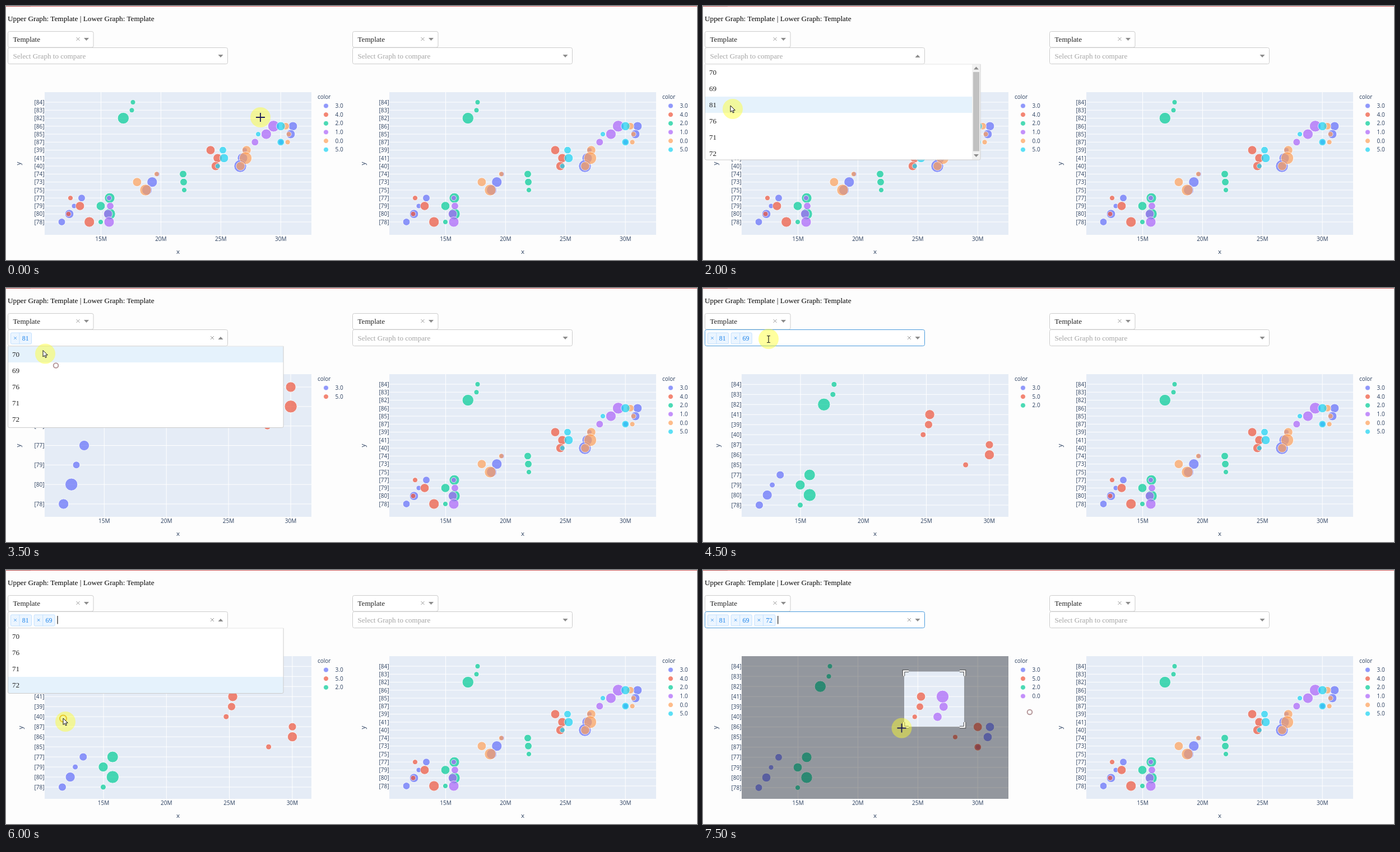
Animation, 1233 px wide and 454 px high, one loop 8000 ms. Source, as an HTML page:

```html
<!DOCTYPE html>
<html lang="en">
<head>
<meta charset="utf-8">
<title>Graph comparison</title>
<style>
html, body { margin: 0; width: 100%; height: 100%; overflow: hidden; background: #fdfdfd; }
svg { display: block; width: 1233px; height: 454px; }
text { white-space: pre; }
.page { font: 13.1px "Liberation Serif", "Times New Roman", serif; fill: #222; }
.head { font-size: 13.25px; fill: #000; }
.tag { font: 11.8px "Liberation Serif", "Times New Roman", serif; fill: #1a82ea; }
.hint { fill: #a5a5a5; }
.plot { font: 10px "Open Sans", sans-serif; fill: #2a3f5f; }
.title { font-size: 11.5px; }
.mid { text-anchor: middle; }
.end { text-anchor: end; }
</style>
</head>
<body>
<svg id="stage" viewBox="0 0 1233 454"></svg>
<script>
const STEP = 500, STEPS = 16;
const PALETTE = ['#636efa', '#ef553b', '#00cc96', '#ab63fa', '#ffa15a', '#19d3f3'];
const MAX_RADIUS = 11.2;

const words = s => s.split(' ');
const TOP = '84 83 82', RIGHT = '86 85 87', MID = '39 41 40', LEFT = '74 73 75', LOW = '77 79 80 78';

// A run of points: one digit of weight per row, x moves by `step` per row, odd rows are shifted by `shift`.
const run = (group, weights, x, step = 0, shift = 0) => words(group).map((row, i) =>
  ({row, weight: +weights[i], x: x + step * i + shift * (i % 2)}));

const POINTS = {
  '3.0': [run(RIGHT, '331', 512, -10.7, 6.7), run(MID, '146', 426, -4), run(LEFT, '144', 270, -9.2), run(LOW, '2132', 135, -11, -2.5)],
  '4.0': [run(MID, '333', 365, 4.6, 8), run('77 80', '11', 115, -3.5), run('79 78', '34', 132, 16.7)],
  '2.0': [run(TOP, '115', 226.5, -8.6, 6.6), run(LEFT, '221', 316, 1), run(LOW, '4351', 185, 0, -16)],
  '1.0': [run(RIGHT, '542', 477.5, -16.6, 3.5), run(LOW, '1234', 184, -1, 3)],
  '0.0': [run(RIGHT, '211', 499, 1.8, 3.8), run(MID, '363', 429.3, -5.4, 3.6), run(LEFT, '135', 268.8, -9.9, -25)],
  '5.0': [run(RIGHT, '312', 490.3, 0, -40.3), run(MID, '231', 387, -4.6, 6.6)]
};

// Each trace may be limited to some rows; `ticks` holds the x of 15M and the distance to the next tick.
const graph = (rows, top, bottom, ticks, traces, yTitle = 26) => ({rows: words(rows), top, bottom, ticks, traces, yTitle});
const BASE = [169.5, 106.9];
const GRAPHS = {
  full: graph(`${TOP} ${RIGHT} ${MID} ${LEFT} ${LOW}`, 172, 386, BASE, words('3.0 4.0 2.0 1.0 0.0 5.0').map(v => [v])),
  one: graph(`87 86 85 ${LOW}`, 177, 386, [175.3, 110.9], [['3.0', LOW], ['5.0']]),
  two: graph(`${TOP} 41 39 40 87 86 85 ${LOW}`, 172.3, 388, [174, 112.3], [['3.0', LOW], ['5.0'], ['2.0']], 30),
  three: graph(`${TOP} 41 39 40 ${RIGHT} ${LOW}`, 172, 389, BASE, [['3.0', `${RIGHT} ${LOW}`], ['5.0'], ['2.0'], ['0.0', MID]])
};

const OPTIONS = words('70 69 81 76 71 72');
const open = hover => ({menu: true, focus: false, hover});
const pick = (...tags) => ({menu: false, focus: true, caret: false, tags});

// One entry per step; each changes part of the state.
const TIMELINE = [
  {graph: 'full', tags: [], cursor: ['cross', 454, 199]},
  {cursor: ['cross', 169, 393]},
  {cursor: ['cross', 148.5, 161]},
  {...open(0), cursor: ['beam', 82, 96]},
  {...open(2), cursor: ['arrow', 53, 184]},
  {...pick('81'), cursor: ['arrow', 61.5, 101], ring: [49, 187]},
  {graph: 'one', cursor: ['beam', 68, 90], ring: null},
  {...open(0), cursor: ['arrow', 70, 117.5], ring: [89, 138.5]},
  {...open(1), caret: true, cursor: ['arrow', 92, 144], ring: null},
  {...pick('81', '69'), graph: 'two', cursor: ['beam', 117, 91]},
  {...open(0), caret: true, cursor: ['arrow', 112, 122]},
  {...open(2), caret: false, cursor: ['arrow', 108, 180]},
  {...open(3), caret: true, cursor: ['arrow', 106, 271], ring: [102, 265.5, 6, '#d39b2a']},
  {...pick('81', '69', '72'), graph: 'three', cursor: ['cross', 146, 288], ring: null},
  {caret: true, cursor: ['cross', 511, 186]},
  {zoom: [359, 181.5, 466, 280], cursor: ['cross', 354.5, 282.5], ring: [583, 254]}
];

const rect = (x, y, w, h, attrs) => `<rect x="${x}" y="${y}" width="${w}" height="${h}" ${attrs}/>`;
const circle = (x, y, r, attrs) => `<circle cx="${x}" cy="${y}" r="${r}" ${attrs}/>`;
const path = (d, attrs) => `<path d="${d}" ${attrs}/>`;
const text = (x, y, s, cls, attrs = '') => `<text x="${x}" y="${y}" class="${cls}" ${attrs}>${s}</text>`;
const cross = (x, y, r, color) => path(`M${x - r} ${y - r}l${2 * r} ${2 * r}m0 ${-2 * r}l${-2 * r} ${2 * r}`, `stroke="${color}"`);
const triangle = (x, y, up) => path(`M${x - 4.5} ${y + (up ? 2.5 : -2.5)}h9l-4.5 ${up ? -5 : 5}z`, 'fill="#8c8c8c"');
const dot = (x, y, r, color) => circle(x, y, r, `fill="${color}" stroke="#fff" opacity=".7"`);

function plot({rows, top, bottom, ticks: [x15, gap], traces, yTitle}) {
  const rowY = row => top + rows.indexOf(row) * (bottom - top) / (rows.length - 1);
  let out = rect(69, 154, 476, 255, 'fill="#e5ecf6"'), grid = '';
  for (const row of rows) {
    grid += `M69 ${rowY(row)}h476`;
    out += text(68.5, rowY(row) + 3.7, `[${row}]`, 'plot end');
  }
  for (let i = 0; i < 4; i++) {
    const x = x15 + i * gap;
    grid += `M${x} 154v255`;
    out += text(x, 420, `${15 + 5 * i}M`, 'plot mid');
  }
  out += path(grid, 'stroke="#fff"');

  const series = traces.map(([value, only]) =>
    POINTS[value].flat().filter(p => rows.includes(p.row) && (!only || only.includes(p.row))));
  const heaviest = Math.max(...series.flat().map(p => p.weight));
  series.forEach((points, t) => {
    for (const p of points) {
      const x = x15 + (p.x - BASE[0]) / BASE[1] * gap;
      out += dot(x, rowY(p.row), MAX_RADIUS * Math.sqrt(p.weight / heaviest), PALETTE[t]);
    }
    const y = 178.5 + t * 15.65;
    out += dot(571, y, 4.5, PALETTE[t]) + text(587.5, y + 3.5, traces[t][0], 'plot');
  });
  return out + text(556, 166, 'color', 'plot') + text(307, 442.5, 'x', 'plot title mid') +
    text(0, 0, 'y', 'plot title mid', `transform="translate(${yTitle} 281.5) rotate(-90)"`);
}

function zoomBox([x1, y1, x2, y2]) {
  const corner = (x, y, sx, sy) => `M${x - sx} ${y + 8 * sy}v${-9 * sy}h${9 * sx}`;
  const d = corner(x1, y1, 1, 1) + corner(x2, y1, -1, 1) + corner(x1, y2, 1, -1) + corner(x2, y2, -1, -1);
  return path(`M69 154H545V409H69zM${x1} ${y1}V${y2}H${x2}V${y1}z`, 'fill="#000" fill-opacity=".36" fill-rule="evenodd"') +
    path(d, 'fill="none" stroke="#444" stroke-width="4.5"') + path(d, 'fill="none" stroke="#fff" stroke-width="2.5"');
}

function controls({tags = [], focus, menu, caret}) {
  const tagX = i => 8.5 + i * 41.7;
  let out = rect(3.5, 45.5, 152.5, 28.5, 'rx="3" fill="#fff" stroke="#ccc"') +
    text(12.5, 64, 'Template', 'page') + cross(128.5, 59, 3, '#999') + triangle(143.5, 59.5) +
    rect(3.5, 74.5, 392, 29, `rx="3" fill="#fff" stroke="${focus ? '#4a9bdc' : '#ccc'}"`) + triangle(383, 89.5, menu);
  if (tags.length) out += cross(368, 89, 3, '#999');
  else out += text(12.5, 94, 'Select Graph to compare', 'page hint');
  tags.forEach((tag, i) => {
    const x = tagX(i);
    out += rect(x, 80, 37, 20, 'rx="2" fill="#ebf5ff" stroke="#c2e0ff"') + path(`M${x + 15.5} 80v20`, 'stroke="#c2e0ff"') +
      cross(x + 8, 89.5, 2.1, '#3a94ee') + text(x + 20.3, 94, tag, 'tag');
  });
  if (caret) out += rect(tagX(tags.length) - .5, 82, 1.2, 14.5, 'fill="#222"');
  return out;
}

function options({tags, hover}) {
  const items = OPTIONS.filter(v => !tags.includes(v));
  const rowHeight = 29, height = Math.min(items.length * rowHeight, 170.5);
  const scrolls = items.length * rowHeight > height;
  const list = rect(0, hover * rowHeight, scrolls ? 476 : 491, rowHeight, 'fill="#e5f2fc"') +
    items.map((v, i) => text(7, 19 + i * rowHeight, v, 'page')).join('');
  let out = rect(4, 104, 491, height, 'fill="#fff"') +
    `<svg x="4" y="104" style="width:491px;height:${height}px">${list}</svg>`;
  if (scrolls) {
    out += rect(480, 104, 14.5, height, 'fill="#f1f1f1"') + rect(482, 118, 11, height - 29, 'fill="#c1c1c1"') +
      triangle(487.5, 111, true) + triangle(487.5, 267.5);
  }
  return out + path(`M3.5 104v${height - 2}q0 2.5 2.5 2.5H492.5q2.5 0 2.5-2.5V104`, 'fill="none" stroke="#ccc"') +
    path('M4 104H495', 'stroke="#e6e6e6"');
}

const POINTERS = {
  cross: path('M-8 0H8M0-8V8', 'stroke="#1c1c58" stroke-width="1.8"'),
  beam: path('M-3-5.5H-.8L0-4.7 .8-5.5H3M0-5V6M-3 6.5H-.8L0 5.7 .8 6.5H3', 'fill="none" stroke="#222" stroke-width="1.2"'),
  arrow: path('M-4-6V5.5L-1.3 3 .4 7 2.3 6.2 .6 2.3H4.3z', 'fill="#fff" stroke="#111"')
};

const pointer = ([kind, x, y]) =>
  `<g transform="translate(${x} ${y})">${circle(0, 0, 18, 'fill="#ffff28" fill-opacity=".45"')}${POINTERS[kind]}</g>`;
const clickRing = ([x, y, r = 4.3, color = '#b79a9c']) => circle(x, y, r, `fill="none" stroke="${color}" stroke-width="2"`);

function render(step) {
  const s = Object.assign({}, ...TIMELINE.slice(0, step + 1));
  stage.innerHTML = rect(0, 0, 1233, 1, 'fill="#d25c5c"') + rect(0, 0, 44, 1, 'fill="#b64747"') +
    text(3, 26.5, 'Upper Graph: Template | Lower Graph: Template', 'page head') +
    `<g transform="translate(615)">${plot(GRAPHS.full)}${controls({})}</g>` +
    plot(GRAPHS[s.graph]) + (s.zoom ? zoomBox(s.zoom) : '') +
    controls(s) + (s.menu ? options(s) : '') +
    (s.ring ? clickRing(s.ring) : '') + pointer(s.cursor);
}

const stage = document.getElementById('stage');
const start = performance.now();
let shown = -1;
function tick() {
  const step = Math.floor((performance.now() - start) / STEP) % STEPS;
  if (step !== shown) render(shown = step);
  requestAnimationFrame(tick);
}
tick();
</script>
</body>
</html>
```
